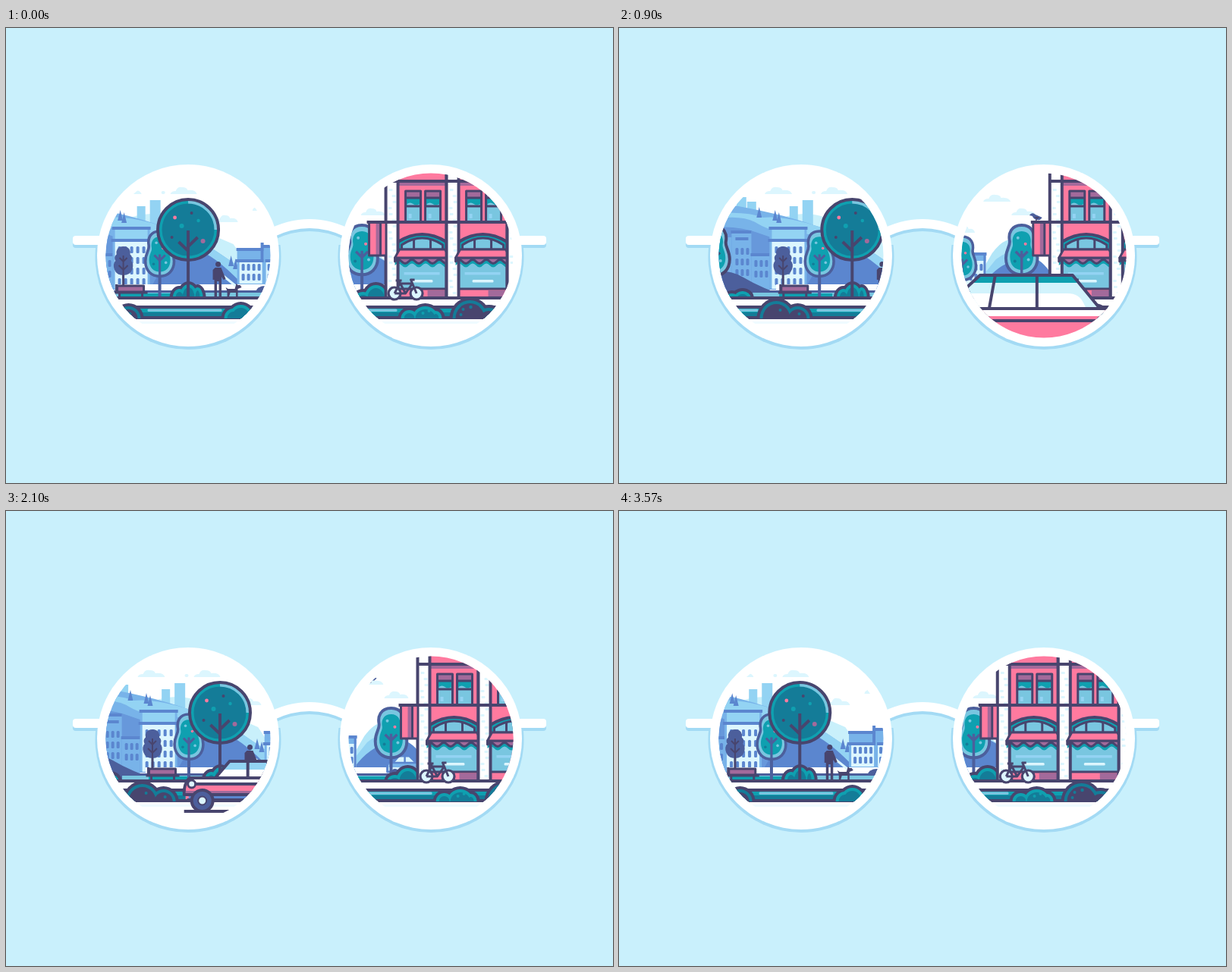
Write an HTML page that moves like this. It is 800x600 px and loops after 3.6 s.

```html
<!DOCTYPE html>
<html lang="en">
<head>
<meta charset="utf-8">
<title>City through glasses</title>
<style>
html,body{margin:0;width:100%;height:100%;overflow:hidden;background:#c9f0fc}
svg{display:block;width:800px;height:600px}
</style>
</head>
<body>
<svg id="stage" viewBox="0 0 800 600" xmlns="http://www.w3.org/2000/svg"></svg>
<script>
const INK = '#48456e', PINK = '#ff7a9f', MAUVE = '#a36a9b', TEAL = '#0fa0b0', DEEP = '#147c98',
  CYAN = '#79c6e0', NAVY = '#4c5f9c', BLUE = '#5b86cf', MID = '#78b3e9', LIGHT = '#93d3f3',
  PALE = '#dcf6fe', WHITE = '#fff', SHADE = '#a3daf4';

const rect = (x, y, w, h, f, r = 0) => `<rect x="${x}" y="${y}" width="${w}" height="${h}" rx="${r}" fill="${f}"/>`;
const path = (d, f = 'none', s = 'none', w = 4) =>
  `<path d="${d}" fill="${f}" stroke="${s}" stroke-width="${w}" stroke-linejoin="round"/>`;
const line = (d, s = INK, w = 4) => path(d, 'none', s, w);
const dot = (x, y, r, f, s = 'none', w = 0) =>
  `<circle cx="${x}" cy="${y}" r="${r}" fill="${f}" stroke="${s}" stroke-width="${w}"/>`;
const group = (s, attr) => `<g ${attr}>${s}</g>`;
const layer = (k, s) => group(s, `class="layer" data-k="${k}"`);
const span = (n, fn) => Array.from({length: n}, (_, i) => fn(i)).join('');

const cloud = (x, y, w) => path(`M${x} ${y}q1 -4 ${w * .2} -4q2 -6 ${w * .25} -5q${w * .17} 0 ${w * .2} 4q${w * .3} -1 ${w * .35} 5z`, PALE);

const fir = (x, y) => path(`M${x} ${y}l3.5 14h-7z`, BLUE);

function windows(x, y, cols, rows, f, dx = 8, dy = 14) {
  return span(rows, j => span(cols, i => rect(x + i * dx, y + j * dy, 4, 9, f, 1.5)));
}

// Humps are [centre, half width, height] standing on a common base.
function bush(humps, base, outer, inner, edge = INK) {
  const pass = (cut, f) => humps.map(([x, rx, ry]) => rx <= cut ? '' :
    path(`M${x - rx + cut} ${base}A${rx - cut} ${ry - cut} 0 0 1 ${x + rx - cut} ${base}Z`, f)).join('');
  return pass(0, edge) + pass(4, outer) + pass(8, inner);
}

const PEAR = 'M0 0C14 0 18 11 16 21C15 28 21 32 21 44C21 58 12 66 0 66C-12 66 -21 58 -21 44C-21 32 -15 28 -16 21C-18 11 -14 0 0 0Z';
function pearTree(x, top, s, edge, foot) {
  return line(`M${x} ${top + 35 * s}V${foot}`, edge) +
    group(path(PEAR, CYAN, edge, 4) +
      group(path(PEAR, TEAL), 'transform="translate(0 8) scale(.74 .78)"') +
      line('M0 34V66M-8 35L0 43L8 35', edge, 3.5) +
      dot(-5, 17, 2, CYAN) + dot(5, 25, 2, PINK) + dot(-9, 48, 2, DEEP) + dot(9, 46, 2, CYAN),
    `transform="translate(${x} ${top}) scale(${s})"`);
}

function roundTree() {
  const x = 240.5, y = 266;
  return dot(x, y, 40, DEEP) + dot(x, y, 36.5, 'none', TEAL, 4) +
    line(`M${x} ${y - 36.5}A36.5 36.5 0 0 1 ${x + 36.5} ${y}`, CYAN, 4) +
    dot(x, y, 40, 'none', INK, 4) +
    dot(223, 250, 2.4, PINK) + dot(260, 281, 3, MAUVE) + dot(232, 261, 3, TEAL) +
    dot(254, 254, 2.2, TEAL) + dot(245, 244, 2, INK) + dot(219, 276, 2, INK) +
    line(`M${x} 267V356M228 282L${x} 294M${x} 288L253 276`);
}

function smallTree() {
  return line('M155 300V348', INK, 3) +
    path('M155 289c7 0 9 5 8 10c4 3 2 7 1 8c5 5 3 18 -9 18c-12 0 -14 -13 -9 -18c-1 -1 -3 -5 1 -8c-1 -5 1 -10 8 -10z', NAVY, NAVY, 2) +
    line('M155 300V330M150 303L155 308L160 303M149 313L155 319L161 313', INK, 2);
}

function city() {
  const main = rect(141, 264, 49, 80, MID) + rect(144, 266, 43, 12, LIGHT) +
    rect(140, 262, 51, 4, BLUE) + rect(139, 278, 53, 4, BLUE) +
    rect(144, 282, 43, 62, PALE) + windows(148, 288, 5, 4, BLUE);
  const left = rect(91, 268, 26, 80, MID) + rect(90, 267, 27, 4, BLUE) + windows(96, 290, 3, 3, BLUE, 7) +
    rect(96, 276, 17, 4, BLUE) + rect(117, 298, 24, 50, MID) + rect(116, 297, 25, 4, BLUE) +
    windows(121, 306, 3, 2, BLUE, 7) + rect(50, 276, 41, 72, MID) + windows(56, 290, 4, 3, BLUE);
  const right = rect(305, 291, 37, 48, MID) + rect(304, 290, 38, 4, BLUE) + rect(303, 305, 39, 4, BLUE) +
    rect(308, 309, 30, 28, PALE) + windows(311, 311, 4, 2, BLUE, 7, 13) +
    rect(336, 283, 4, 25, BLUE) + rect(340, 287, 28, 52, MID) + rect(338, 286, 30, 4, BLUE) +
    rect(342, 305, 26, 4, BLUE) + rect(343, 309, 25, 28, PALE) + windows(345, 311, 3, 2, BLUE, 7, 13);
  const far = rect(386, 298, 40, 40, PALE) + rect(384, 296, 43, 4, BLUE) + rect(386, 300, 40, 7, MID) +
    windows(390, 311, 5, 2, BLUE, 7, 13) + rect(423, 298, 3, 40, BLUE);
  return left + main + right + far;
}

function bench() {
  return line('M150 348V355M180 348V355M146 338V350', INK, 3) +
    path('M147 340H182V348H147Z', MAUVE, INK, 3) + line('M143 349H187', INK, 3);
}

function walker() {
  return line('M287 327L303 340', PALE, 3) + dot(280, 311.5, 3.5, INK) +
    path('M276 316H284L290 331L287 332L284.5 328V354H281V334H278.5V354H275V332H273V319Z', INK) +
    path('M290 342L293 344H302L304 337L306 339H309L311 342L306 344V354H303.5V349H296L294.5 354H292V347Z', INK);
}

function bay(x) {
  const win = wx => rect(wx, 215, 20, 40, CYAN) + rect(wx, 215, 20, 9, MAUVE) + rect(wx, 225, 20, 10, TEAL) +
    path(`M${wx + 2} 232q4 -3 8 0t8 0v3h-16z`, CYAN) + rect(wx + 4, 245, 4, 6, LIGHT) +
    line(`M${wx} 255V215H${wx + 20}V255M${wx} 224H${wx + 20}M${wx} 235H${wx + 20}`, INK, 3);
  const wave = 'q-4.5 5 -9 0t-9 0'.repeat(4);
  return rect(x, 180, 64, 176, PINK) + rect(x, 204, 64, 4, MAUVE) + win(x + 10) + win(x + 36) +
    path(`M${x} 292V282Q${x + 32} 262 ${x + 64} 282V292Z`, TEAL) +
    path(`M${x + 5} 292V286Q${x + 32} 268 ${x + 59} 286V292Z`, CYAN, INK, 3) +
    line(`M${x + 21} 278V292M${x + 43} 278V292`, INK, 3) +
    line(`M${x} 282Q${x + 32} 262 ${x + 64} 282`) +
    rect(x, 306, 64, 37, CYAN) + rect(x + 8, 322, 47, 3.5, LIGHT) + rect(x + 18, 332, 28, 3.5, PALE, 1.5) +
    path(`M${x - 4} 306H${x + 68}V313${wave}Z`, TEAL) +
    rect(x + 39, 346, 25, 9, MAUVE) + line(`M${x} 344H${x + 64}`, INK, 3) +
    line(`M${x} 180V356M${x + 64} 180V356`) +
    path(`M${x - 4} 303H${x + 68}V308${wave}Z`, MAUVE, INK, 3) +
    path(`M${x + 2} 292H${x + 62}L${x + 68} 303H${x - 4}Z`, PINK, INK, 3);
}

function house() {
  const column = x => rect(x, 180, 16, 175, WHITE) +
    span(9, i => rect(x + 4 + i % 2 * 5, 212 + i * 16, 5, 3, PALE, 1) + rect(x + 8 - i % 2 * 5, 220 + i * 16, 5, 3, PALE, 1)) +
    line(`M${x} 180V356`);
  return span(3, i => column(501 + 80 * i) + bay(517 + 80 * i)) +
    path('M480 257H500V300H480Z', PINK) + rect(488, 258, 5, 42, MAUVE) +
    line('M479 256V300H501M494 258V300', INK, 3) +
    line('M476 256H760M501 202H760');
}

function bike() {
  const wheel = x => dot(x, 350, 8, PALE, INK, 3.2);
  return wheel(512.5) + wheel(541.5) +
    line('M512.5 350L519 337H536L527 350H512.5M518 333L527 350M541.5 350L534 332H539M514 333H522', INK, 3);
}

// A left-facing saloon.
function car() {
  const wheel = x => dot(x, 382, 14, NAVY, INK, 4) + dot(x, 382, 5.5, PALE, INK, 2);
  return path('M520 352L538 331H597L619 352Z', WHITE) + path('M530 341L538 332H597L607 341Z', LIGHT) +
    path('M520 352H485Q480 356 480 371V380H622V352Z', PINK) +
    path('M520 352H485L482 359H622V352Z', WHITE) + rect(480, 369, 142, 5, MAUVE) + rect(484, 375, 136, 6, BLUE) +
    line('M520 351L538 330H597L621 352V374H478V368Q480 355 486 352H621M562 331V351M588 331L592 351M484 360H620M482 381H618') +
    dot(488, 360, 5, PALE, INK, 3) + wheel(502) + wheel(596) + line('M478 396H624');
}

// A right-facing saloon passing close by.
function nearCar() {
  const wheel = x => dot(x, 432, 28, NAVY, INK, 6);
  return path('M62 370L110 326H232L268 370Z', '#d2f3fc') +
    path('M76 350H226Q240 350 246 362L250 370H62Z', WHITE) +
    path('M99 336L110 327H232L242 336Z', TEAL) +
    path('M62 370H340Q354 376 356 404V426H60Z', PINK) +
    path('M62 371H340L350 380H60Z', WHITE) +
    path('M262 414Q290 392 330 389H354V426H262Z', MAUVE) +
    line('M62 370L110 326H232L268 370M185 326V370M130 326L122 370M60 426V370H340Q354 376 356 404V426M60 386H352') +
    wheel(116) + wheel(304);
}

const farCar = path('M155 344V335Q156 332 163 331L170 323H184L192 331Q198 333 198 344Z', PALE, BLUE, 3) +
  rect(157, 333, 40, 5, MID) + line('M157 332H196M178 323V332', BLUE, 2.5) +
  dot(165, 344, 4, NAVY) + dot(189, 344, 4, NAVY);

const bird = path('M476 245Q479 243 482 246L491 250L488 253Q480 254 478 248L474 247Z', NAVY) +
  path('M480 249L488 249L484 252Z', INK) + line('M483 252V256', INK, 1.5);

const hills = path('M40 345V240Q75 232 97 234Q120 238 150 245T202 260Q245 272 280 296L330 330V345Z', MID) +
  path('M60 246Q110 240 135 250Q160 247 202 260Q245 272 280 296L330 330H304Q250 284 200 272Q150 272 128 258T60 254Z', LIGHT) +
  path('M40 345V268Q90 256 128 270T200 290L230 345Z', '#6798db') +
  path('M190 345Q215 296 240 288Q275 296 318 345Z', BLUE) +
  fir(130, 236) + fir(151, 240) + fir(156, 243) + fir(297, 300) + fir(303, 304) +
  path('M410 345L442 305Q463 288 484 300T520 345Z', LIGHT) +
  path('M420 345Q440 315 463 308Q490 290 512 320V345Z', BLUE);

const scene =
  layer(.735, cloud(143, 219, 36) + cloud(217, 219, 35) + rect(205, 215, 5, 4, PALE, 2) + cloud(276, 256, 30) +
    cloud(325, 241, 16) + cloud(431, 229, 36) + cloud(468, 247, 32) + cloud(396, 270, 24)) +
  layer(.775, path('M150 345V256Q190 236 225 252T300 285L340 345Z', '#c9f0fb') +
    rect(103, 223, 13, 30, LIGHT) + rect(117, 229, 12, 30, LIGHT) + rect(173, 235, 11, 40, LIGHT) + rect(190, 227, 14, 40, LIGHT) +
    path('M412 345L440 297Q458 272 474 282L540 345Z', '#b2e6f8')) +
  layer(.82, hills) +
  layer(.86, city()) +
  layer(.916, path('M40 356V325Q78 314 103 329T166 356Z', NAVY)) +
  layer(.916, rect(146, 338, 400, 8, WHITE) + bush([[342, 12, 8], [350, 8, 6]], 348, NAVY, NAVY, NAVY) +
    bush([[403, 8, 7], [409, 7, 5]], 348, NAVY, NAVY, NAVY)) +
  group(farCar, 'id="farCar"') +
  layer(.916, rect(115, 346, 430, 3, NAVY) + rect(115, 349, 430, 6, CYAN) + rect(150, 350, 70, 5, TEAL) + rect(420, 350, 70, 5, TEAL) +
    smallTree() + pearTree(203, 268, .9, NAVY, 355) + pearTree(391, 275, .87, NAVY, 355) + pearTree(469.5, 260, .99, NAVY, 355)) +
  layer(1, pearTree(58, 261, 1, INK, 355) + bush([[82, 13, 10], [96, 15, 13]], 356, TEAL, DEEP) + bench() +
    bush([[229, 13, 16], [241, 16, 22], [253, 11, 18]], 356, TEAL, DEEP) + roundTree() + walker() +
    bush([[471, 14, 12], [488, 19, 21]], 356, TEAL, DEEP) + house() + group(bird, 'id="bird"') +
    rect(0, 357, 800, 10, WHITE) + line('M0 356H800') + bike()) +
  rect(120, 368, 560, 14, TEAL) + rect(120, 375, 560, 5, DEEP) +
  layer(1.1, rect(187, 370.5, 98, 3.5, CYAN, 1.5) + rect(40, 370.5, 70, 3.5, CYAN, 1.5) + rect(416, 370.5, 100, 3.5, CYAN, 1.5)) +
  line('M100 368H700M100 382H700') + rect(120, 387, 560, 3, '#effbff') +
  layer(1.1, bush([[134, 26, 27], [162, 20, 20]], 383, DEEP, INK) + dot(139, 372, 2, DEEP) + dot(164, 377, 2, DEEP) +
    bush([[300, 16, 17], [310, 20, 22], [324, 12, 14]], 383, TEAL, DEEP) +
    bush([[532, 15, 15], [553, 21, 20], [567, 12, 14]], 383, TEAL, DEEP) + dot(550, 376, 2, TEAL) + dot(558, 373, 2, TEAL) +
    bush([[612, 27, 28], [637, 20, 18]], 383, DEEP, INK) + dot(603, 371, 2, DEEP) + dot(613, 368, 2.2, DEEP) + dot(600, 378, 2, DEEP)) +
  group(car(), 'id="car"') + group(nearCar(), 'id="nearCar"');

const lenses = fn => [240, 560].map(fn).join('');
const bridge = dy => `M350 ${270 + dy}Q400 ${246 + dy} 450 ${270 + dy}`;
const arms = (y, f) => rect(88, y, 40, 12, f, 4) + rect(672, y, 40, 12, f, 4);

document.getElementById('stage').innerHTML =
  `<defs><clipPath id="lens">${lenses(x => dot(x, 300, 108.5, WHITE))}</clipPath></defs>` +
  rect(0, 0, 800, 600, '#c9f0fc') +
  arms(278, SHADE) + line(bridge(4), SHADE, 12) +
  lenses(x => path(`M${x - 121.5} 286A122.5 122.5 0 1 0 ${x + 121.5} 286Z`, SHADE)) +
  arms(274, WHITE) + line(bridge(0), WHITE, 12) + lenses(x => dot(x, 300, 120, WHITE)) +
  group(scene, 'clip-path="url(#lens)"');

const LOOP = 3600;
const layers = [...document.querySelectorAll('.layer')];
const part = id => document.getElementById(id);
const move = (el, x, y = 0) => el.setAttribute('transform', `translate(${x.toFixed(2)} ${y.toFixed(2)})`);
const clamp = v => Math.max(0, Math.min(1, v));
const [carEl, nearEl, farEl, birdEl] = ['car', 'nearCar', 'farCar', 'bird'].map(part);

function draw(t) {
  const sway = 47.6 * Math.sin(2 * Math.PI * t / LOOP - .737) + 31.5;
  layers.forEach(el => move(el, sway * el.dataset.k));
  move(carEl, -.674 * (t - 1740));
  move(nearEl, 1.35 * (t - 630));
  move(farEl, -.4 * (t - 2970));
  const away = Math.max(1 - clamp((t - 200) / 350), clamp((t - 1850) / 400));
  move(birdEl, -70 * away, -75 * away * away);
  birdEl.setAttribute('opacity', away < 1 ? 1 : 0);
}

function tick() {
  draw(performance.now() % LOOP);
  requestAnimationFrame(tick);
}
tick();
</script>
</body>
</html>
```
